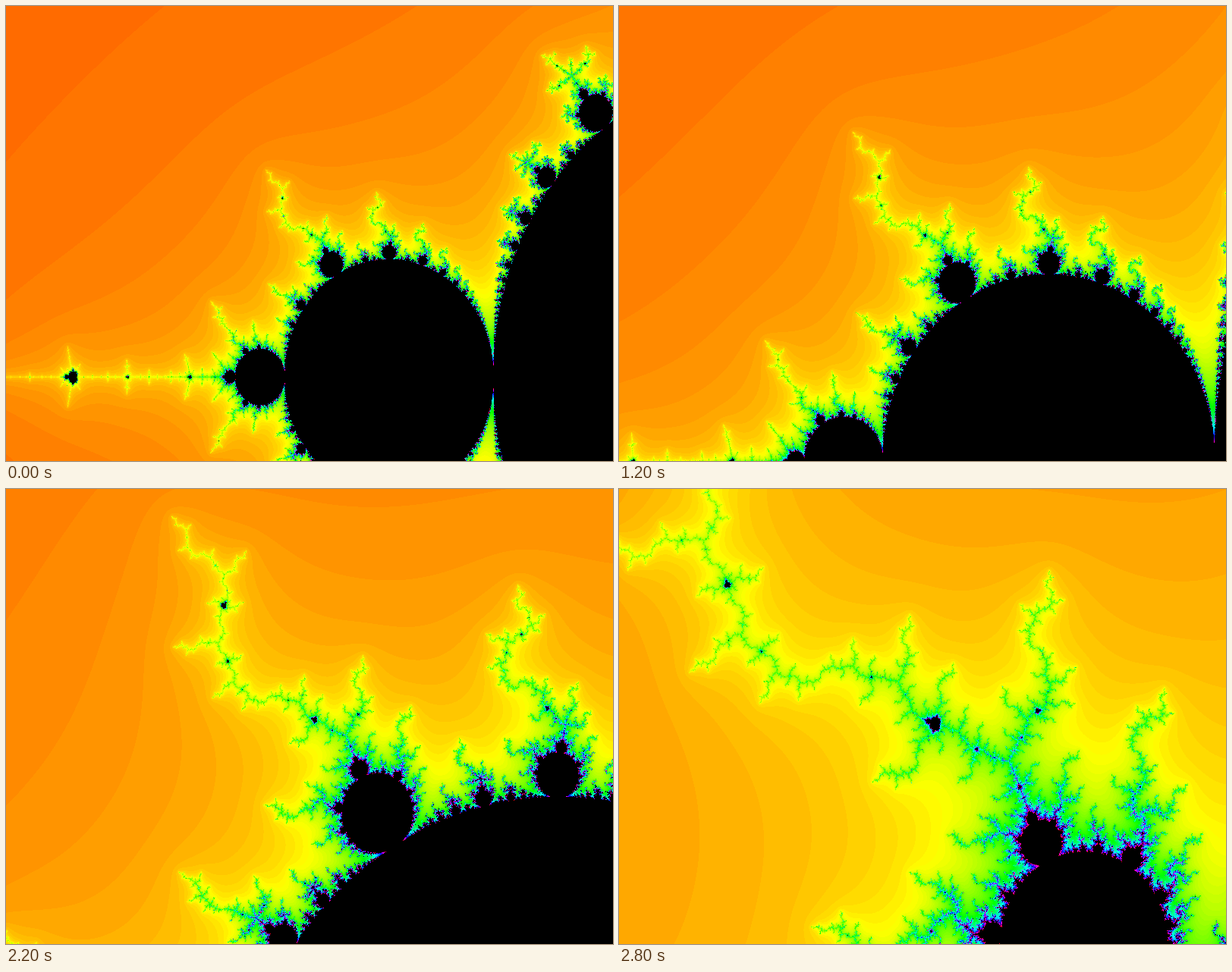
Write an HTML page with a canvas that moves like this. It is 800 px wide and 600 px high and loops after 2900 ms.

```html
<!DOCTYPE html>
<html lang="en">
<head>
<meta charset="utf-8">
<title>Mandelbrot zoom</title>
<style>
  html, body { margin: 0; width: 100%; height: 100%; overflow: hidden; background: #000; }
  canvas { display: block; }
</style>
</head>
<body>
<canvas id="stage" width="800" height="600"></canvas>
<script>
const WIDTH = 800, HEIGHT = 600;
const STEPS = 29, STEP_MS = 100;
const CENTER = { re: -1.19, im: 0.305 };
const MAX_ITER = 144, ESCAPE_SQ = 65536;
const BLACK = 0xff000000;

const ctx = document.getElementById('stage').getContext('2d');
const image = ctx.createImageData(WIDTH, HEIGHT);
const pixels = new Uint32Array(image.data.buffer);

// Fully saturated hue in degrees, packed as ABGR.
function hueColor(hue) {
  const channel = shift => {
    const k = (shift + hue / 60) % 6;
    return Math.round(255 * (1 - Math.max(0, Math.min(k, 4 - k, 1))));
  };
  return (BLACK | channel(1) << 16 | channel(3) << 8 | channel(5)) >>> 0;
}

const palette = Array.from({ length: MAX_ITER + 1 }, (_, n) => hueColor(13.2 + 2.4 * n));

function insideMainBulbs(re, imSq) {
  const d = re - 0.25, q = d * d + imSq;
  return q * (q + d) <= imSq / 4 || (re + 1) * (re + 1) + imSq <= 1 / 16;
}

function colorAt(re, im) {
  if (insideMainBulbs(re, im * im)) return BLACK;
  let x = 0, y = 0, xx = 0, yy = 0;
  for (let n = 1; n <= MAX_ITER; n++) {
    y = 2 * x * y + im;
    x = xx - yy + re;
    xx = x * x;
    yy = y * y;
    if (xx + yy > ESCAPE_SQ) return palette[n];
  }
  return BLACK;
}

// The view shrinks by a constant amount each step; it is 3:2 on a 4:3 stage.
function render(step) {
  const halfH = 0.485 - 0.015 * step, halfW = 1.5 * halfH;
  const dx = 2 * halfW / WIDTH, dy = 2 * halfH / HEIGHT;
  let i = 0;
  for (let py = 0; py < HEIGHT; py++) {
    const im = CENTER.im + halfH - py * dy;
    for (let px = 0; px < WIDTH; px++) {
      pixels[i++] = colorAt(CENTER.re - halfW + px * dx, im);
    }
  }
  ctx.putImageData(image, 0, 0);
}

let shown = -1;
function tick() {
  const step = Math.floor(performance.now() / STEP_MS) % STEPS;
  if (step !== shown) {
    shown = step;
    render(step);
  }
  requestAnimationFrame(tick);
}
tick();
</script>
</body>
</html>
```
